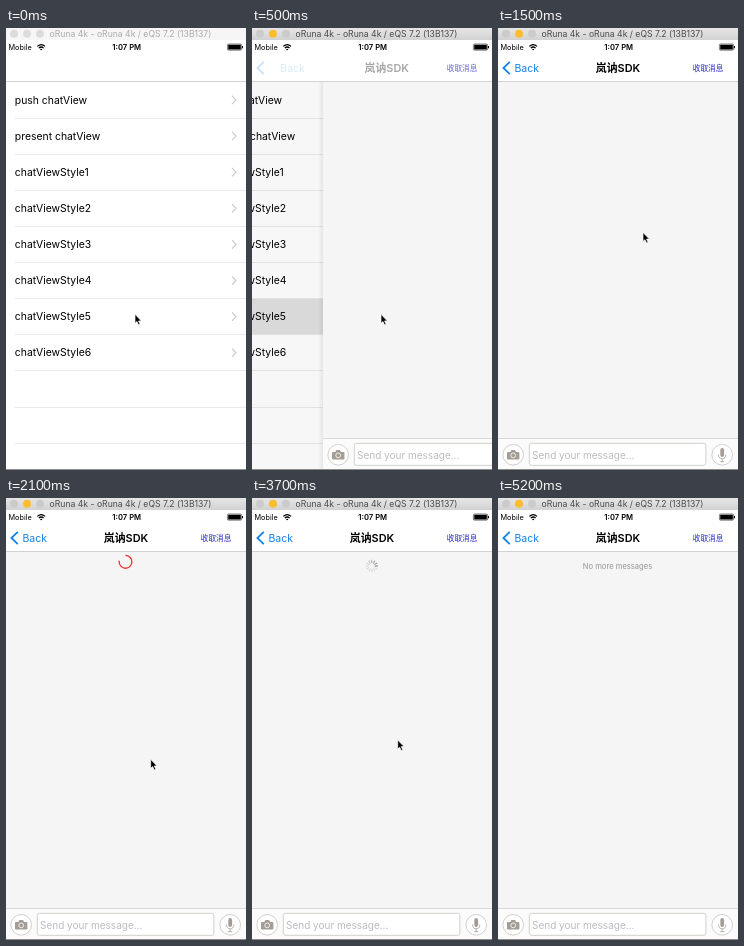
An HTML page for the animation above (5.4 s loop, 240x442 px).

```html
<!DOCTYPE html>
<html lang="en">
<head>
<meta charset="utf-8">
<style>
  html, body { margin: 0; width: 100%; height: 100%; overflow: hidden; background: #fff; }
  svg { display: block; width: 240px; height: 442px; font: 10.4px Inter, "Noto Sans CJK SC", "Noto Sans CJK", sans-serif; }
  .mid { text-anchor: middle; }
  .line { stroke: #e9e9eb; fill: none; shape-rendering: crispEdges; }
  .hint { fill: #bcbcc0; }
  .blue { fill: #1482e6; }
</style>
</head>
<body>
<svg viewBox="0 0 240 442">
  <defs>
    <linearGradient id="bar" x2="0" y2="1">
      <stop stop-color="#e6e6e6"/><stop offset="1" stop-color="#d2d2d2"/>
    </linearGradient>
    <linearGradient id="shade">
      <stop stop-opacity="0"/><stop offset="1" stop-opacity=".07"/>
    </linearGradient>
    <clipPath id="body"><path d="M0 54H240V442H0Z"/></clipPath>
  </defs>
  <path fill="#fff" d="M0 0H240V442H0Z"/>

  <g clip-path="url(#body)">
    <g id="list"></g>
    <rect id="dim" y="54" width="240" height="388"/>
    <g id="page">
      <path fill="url(#shade)" d="M-5 54H0V442H-5Z"/>
      <path fill="#f5f5f5" d="M0 54H240V442H0Z"/>
      <path fill="#fbfbfb" d="M0 410H240V442H0Z"/>
      <path class="line" style="stroke:#d9d9d9" d="M0 410.5H240"/>
      <g fill="#fff" stroke="#d3d0cc">
        <circle cx="15.2" cy="426.8" r="10.3"/>
        <circle cx="224.2" cy="426.8" r="10.3"/>
        <rect x="31.3" y="415.3" width="176.6" height="22" rx="2.2"/>
      </g>
      <g fill="#a39d96">
        <path d="M10 424H12.4L13.4 422H17L18 424H20.4Q21.4 424 21.4 425V430.6Q21.4 431.6 20.4 431.6H10Q9 431.6 9 430.6V425Q9 424 10 424Z"/>
        <circle cx="15.2" cy="427.4" r="2.4" stroke="#fff" stroke-width=".8"/>
        <rect x="222.3" y="420" width="3.8" height="9" rx="1.9"/>
        <path fill="none" stroke="#a39d96" stroke-width=".8" d="M220.5 426.5Q220.7 430.8 224.2 430.8T227.9 426.5M224.2 431V434M222.2 433.7H226.2"/>
      </g>
      <text class="hint" x="34" y="430.6" font-size="10">Send your message...</text>
    </g>
    <circle id="ring" cx="119.5" r="6.4" fill="none" stroke="#f0302a" stroke-width="1.3" pathLength="100"/>
    <g id="spinner" stroke="#7c7c7c" stroke-linecap="round"></g>
    <text id="note" class="mid" x="119.5" y="71.3" font-size="7.6" fill="#969696">No more messages</text>
  </g>

  <path class="line" style="stroke:#d2d2d4" d="M0 53.5H240"/>
  <g id="back">
    <path fill="none" stroke="#1482e6" stroke-width="1.8" d="M11.8 33.8L5.4 40L11.8 46.2"/>
    <text id="backText" class="blue" x="16.5" y="43.8" font-size="10.5">Back</text>
  </g>
  <text id="title" class="mid" x="120" y="43.8" font-size="10.9" font-weight="600">岚讷SDK</text>
  <text id="action" x="194.8" y="43" font-size="7.65" fill="#2424c8">收取消息</text>

  <text x="2.5" y="21.8" font-size="7.3">Mobile</text>
  <g fill="none" stroke="#000" stroke-width="1.2">
    <path d="M31.3 18.4Q35.2 14.8 39.1 18.4M32.8 20.1Q35.2 17.9 37.6 20.1"/>
    <path d="M34.3 21.5H36.1"/>
  </g>
  <text class="mid" x="120.7" y="21.9" font-size="7.6" font-weight="600">1:07 PM</text>
  <rect x="221.4" y="16" width="14.2" height="6.2" rx="1.2" fill="none" stroke="#000" stroke-width=".5"/>
  <path d="M222.2 16.8H234.8V21.4H222.2ZM236 18H237V20.2H236Z"/>

  <rect id="bar-bg" width="240" height="12"/>
  <g id="lights"><circle cx="8" cy="5.7" r="4"/><circle cx="21" cy="5.7" r="4"/><circle cx="34" cy="5.7" r="4"/></g>
  <text id="window" class="mid" x="124.5" y="9" font-size="8.65">oRuna 4k - oRuna 4k / eQS 7.2 (13B137)</text>
  <path fill="#8c8c8c" d="M0 441H240V442H0Z"/>
  <path id="cursor" stroke="#fff" stroke-width=".7" d="M0 0V9L2 7.2L3.5 10.6L5.1 9.9L3.6 6.6H6.4Z"/>
</svg>
<script>
const $ = id => document.getElementById(id);
const LOOP = 5400, STEP = 100, ROW = 36.12;
const clamp = v => Math.max(0, Math.min(1, v));
const set = (id, attrs) => { for (const k in attrs) $(id).setAttribute(k, attrs[k]); };
const shift = (x, y = 0) => `translate(${x} ${y})`;

// Linear interpolation through [time, ...values] keys.
function at(keys, t) {
  const i = keys.findIndex(k => k[0] > t);
  if (i < 0) return keys[keys.length - 1].slice(1);
  if (i === 0) return keys[0].slice(1);
  const a = keys[i - 1], b = keys[i], f = (t - a[0]) / (b[0] - a[0]);
  return a.slice(1).map((v, j) => v + (b[j + 1] - v) * f);
}

const pointer = [
  [0, 129, 286.3], [700, 129, 286.3], [900, 134, 264.5], [1100, 143, 215.5], [1200, 145, 204.5],
  [1500, 145, 204.5], [2000, 145, 258.5], [2600, 143, 275.5], [2700, 143.3, 279], [3000, 143.3, 279],
  [3300, 145, 258.5], [3600, 145.7, 242], [4700, 145.7, 242], [4900, 145, 242.5], [5000, 145, 242.5], [5100, 124.5, 225]
];
const pull = [[1500, 46], [2000, 62], [2600, 73], [2700, 74]];

const labels = ["push chatView", "present chatView", ...[1, 2, 3, 4, 5, 6].map(n => "chatViewStyle" + n)];
let rows = `<rect id="pressed" y="271" width="240" height="36" fill="#d9d9d9"/>`;
for (let i = 0; i < 10; i++) {
  const y = 54 + i * ROW, bottom = Math.floor(y + ROW) + .5;
  rows += `<path class="line" d="M9 ${bottom}H240"/>`;
  if (labels[i]) rows += `<text x="8.8" y="${Math.round(y + 21.6)}">${labels[i]}</text>
    <path fill="none" stroke="#c7c7cc" stroke-width="1.1" d="M226 ${y + 13.7}l4 4.2l-4 4.2"/>`;
}
$("list").innerHTML = rows;

for (let i = 0; i < 12; i++)
  $("spinner").innerHTML += `<path d="M3.3 0H5.8" transform="rotate(${i * 30})"/>`;

function draw(t) {
  const active = t >= 200;
  set("bar-bg", { fill: active ? "url(#bar)" : "#f6f6f6" });
  set("window", { fill: active ? "#4a4a4a" : "#ababab" });
  [...$("lights").children].forEach((c, i) =>
    c.setAttribute("fill", !active ? "#dcdcdc" : i === 1 ? "#fdbd2e" : "#cbcbcb"));

  // Critically damped push transition
  const s = Math.max(0, t - 349) * .0163;
  const p = t < 400 ? 0 : 1 - (1 + s) * Math.exp(-s);
  set("page", { transform: shift(t < 400 ? 260 : Math.round(240 * (1 - p))) });
  set("list", { transform: shift(Math.round(-72 * p)) });
  set("dim", { opacity: .06 * p * p });
  set("pressed", { opacity: t < 400 ? 0 : clamp((900 - t) / 500) });
  set("back", { opacity: clamp((t - 380) / 520) });
  set("backText", { transform: shift(40 * (1 - p)), opacity: p });
  set("title", { opacity: p ** 3, transform: shift(50 * (1 - p)) });
  set("action", { opacity: p });

  const [y] = at(pull, t);
  const arc = 100 * clamp((y - 45) / 24);
  set("ring", {
    cy: y, opacity: +(t > 1500 && t < 3100),
    "stroke-dasharray": arc >= 100 ? "none" : `${arc} 100`,
    transform: `rotate(-90 119.5 ${y})`
  });

  const [sy] = at([[3000, 74], [3300, 68]], t);
  set("spinner", { opacity: +(t >= 3100 && t < 4100), transform: shift(119.8, sy) });
  const head = Math.floor((t - 3700) / 83.33);
  [...$("spinner").children].forEach((b, i) => {
    const age = ((head - i) % 12 + 12) % 12;
    b.setAttribute("opacity", Math.max(.25, 1 - age * .13));
  });
  set("note", { opacity: clamp((t - 4200) / 300) });

  const [cx, cy] = at(pointer, t);
  set("cursor", { transform: shift(cx, cy), opacity: +(t < 5200) });
}

function tick() {
  draw(Math.floor(performance.now() % LOOP / STEP) * STEP);
  requestAnimationFrame(tick);
}
tick();
</script>
</body>
</html>
```
